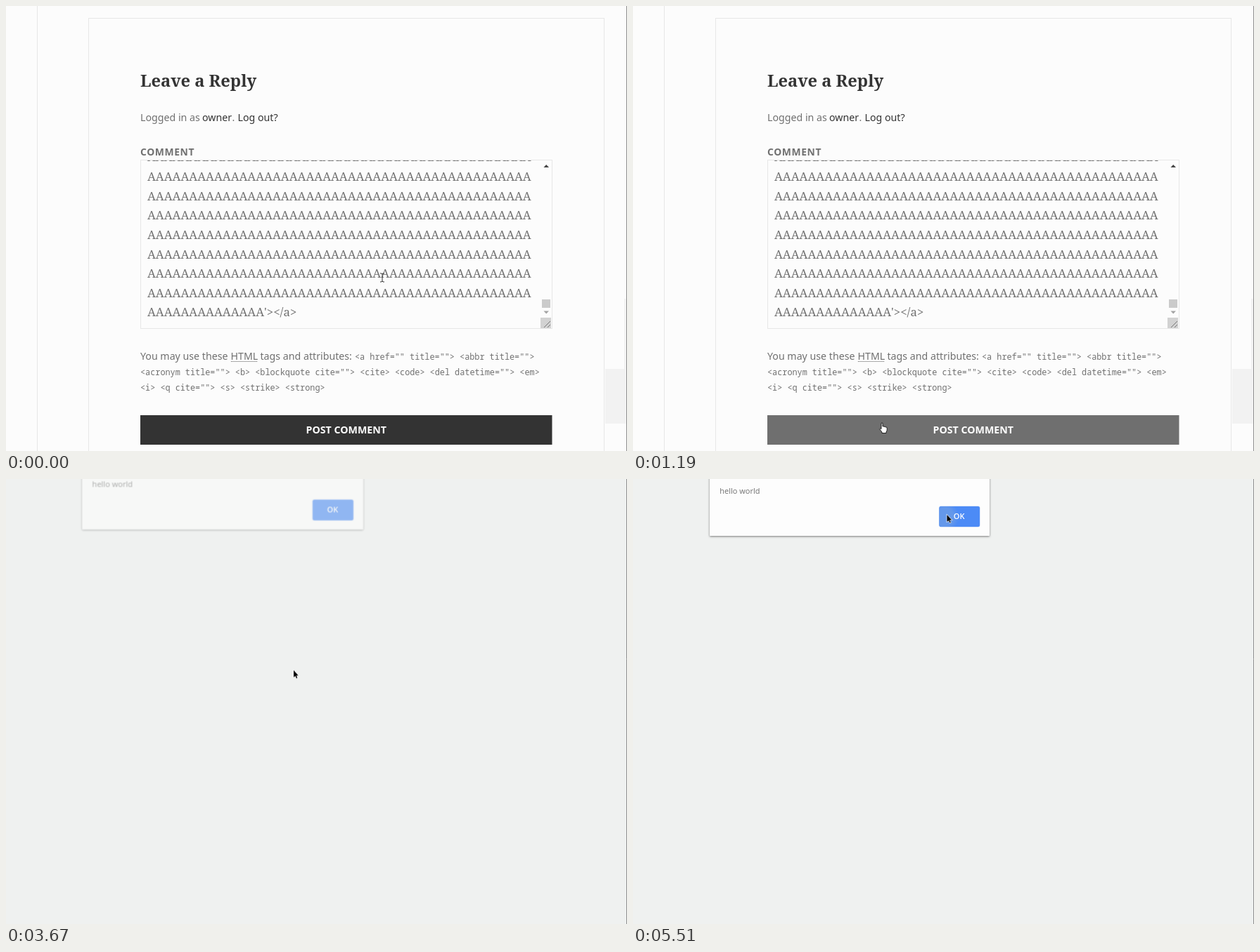
These frames come from a looping animation (883x634 px, 5.63 s). An HTML page:

```html
<!DOCTYPE html>
<html lang="en">
<head>
<meta charset="utf-8">
<title>Reply form</title>
<style>
html, body { margin: 0; width: 100%; height: 100%; overflow: hidden; background: #fcfcfc; }
svg { display: block; width: 883px; height: 634px; }
text { white-space: pre; fill: #707070; }
.sans { font: 14.2px "Noto Sans", sans-serif; }
.bold { font-weight: 700; }
.dark { fill: #333; }
.white { fill: #fff; }
.title { font: 700 23.7px "Noto Serif", serif; fill: #333; }
.label { font-size: 13.9px; letter-spacing: .6px; }
.code { font: 11.83px "Noto Sans Mono", monospace; }
.area text { font: 16.83px "Noto Serif", serif; font-kerning: none; }
.dialog text { font: 11px "Open Sans", sans-serif; }
.dialog .ok { font-weight: 600; fill: #fff; }
.line { fill: none; stroke: #e7e7e7; }

/* every change is a hard cut */
.anim { animation: 5630ms step-end infinite; }
.post { animation-name: post; }
.alert { animation-name: alert; }
.dialog { animation-name: dialog; }
.face { animation-name: face; }
.ripple { animation-name: ripple; }
.pointer { animation-name: move; }
.beam { animation-name: beam; }
.arrow { animation-name: arrow; }
.hand { animation-name: hand; }

@keyframes post {
  0% { fill: #333; }
  16.341% { fill: #525252; }
  18.472%, 100% { fill: #6f6f6f; }
}
@keyframes alert {
  0% { visibility: hidden; }
  65.186%, 100% { visibility: visible; }
}
@keyframes dialog {
  0% { opacity: .55; transform: translate(-1.2px, -9.6px) scale(1.004); }
  67.673%, 100% { opacity: 1; transform: none; }
}
@keyframes face {
  0% { fill: #4285f4; }
  88.454% { fill: #4587f5; }
  93.428%, 100% { fill: #4c8bf6; }
}
@keyframes ripple {
  0% { opacity: 0; }
  93.428% { opacity: .5; }
  97.868%, 100% { opacity: 1; }
}
@keyframes move {
  0% { transform: translate(535px, 387px); }
  4.973% { transform: translate(527px, 398px); }
  7.193% { transform: translate(492px, 434px); }
  9.413% { transform: translate(430px, 497px); }
  11.634% { transform: translate(372px, 556px); }
  13.854% { transform: translate(350.5px, 580px); }
  16.341% { transform: translate(350.5px, 587px); }
  18.472% { transform: translate(350.5px, 594px); }
  21.136% { transform: translate(354px, 594px); }
  55.417% { transform: translate(370px, 525px); }
  57.548% { transform: translate(398px, 364px); }
  60.39% { transform: translate(409px, 272.5px); }
  73.179% { transform: translate(412px, 258px); }
  75.843% { transform: translate(420px, 212px); }
  78.063% { transform: translate(431px, 138px); }
  80.284% { transform: translate(439px, 72px); }
  82.948% { transform: translate(444px, 39px); }
  85.612%, 100% { transform: translate(446.5px, 51px); }
}
@keyframes beam {
  0% { visibility: visible; }
  9.413%, 100% { visibility: hidden; }
}
@keyframes arrow {
  0% { visibility: hidden; }
  9.413% { visibility: visible; }
  21.136% { visibility: hidden; }
  55.417%, 100% { visibility: visible; }
}
@keyframes hand {
  0% { visibility: hidden; }
  21.136% { visibility: visible; }
  55.417%, 100% { visibility: hidden; }
}
</style>
</head>
<body>
<svg viewBox="0 0 883 634">
  <defs>
    <clipPath id="box"><rect x="192" y="220" width="568" height="239"/></clipPath>
    <clipPath id="key"><rect x="435.5" y="39" width="57.5" height="29" rx="2.5"/></clipPath>
    <radialGradient id="glow">
      <stop offset=".6" stop-color="#6498ea"/>
      <stop offset="1" stop-color="#6498ea" stop-opacity="0"/>
    </radialGradient>
    <filter id="shadow" x="-5%" y="-20%" width="110%" height="150%">
      <feDropShadow dx="0" dy="1" stdDeviation="1.6" flood-opacity=".5"/>
    </filter>
  </defs>

  <rect width="883" height="634" fill="#fcfcfc"/>
  <path class="line" d="M44.5 0V634"/>
  <rect class="line" x="117.5" y="17.5" width="733" height="640"/>
  <path d="M852 517H879V417H882V595H852Z" fill="#f2f2f2"/>

  <text class="title" x="191" y="114.7">Leave a Reply</text>
  <g class="sans">
    <text x="191" y="164">Logged in as</text>
    <text class="dark" x="279" y="164">owner</text>
    <text x="321.5" y="164">.</text>
    <text class="dark" x="329.5" y="164">Log out?</text>
    <text class="bold label" x="191" y="213.3">COMMENT</text>
    <text x="191" y="504">You may use these</text>
    <text x="319.5" y="504">HTML</text>
    <text x="361.5" y="504">tags and attributes:</text>
  </g>
  <path d="M320 506.5H358" stroke="#555" stroke-dasharray="1 1"/>
  <g class="code">
    <text x="496" y="504">&lt;a href="" title=""&gt; &lt;abbr title=""&gt;</text>
    <text x="191" y="526">&lt;acronym title=""&gt; &lt;b&gt; &lt;blockquote cite=""&gt; &lt;cite&gt; &lt;code&gt; &lt;del datetime=""&gt; &lt;em&gt;</text>
    <text x="191" y="548">&lt;i&gt; &lt;q cite=""&gt; &lt;s&gt; &lt;strike&gt; &lt;strong&gt;</text>
  </g>

  <rect class="line" x="191.5" y="219.5" width="585" height="240"/>
  <g class="area" id="rows" clip-path="url(#box)"></g>
  <path d="M764.5 230H772L768.2 226Z" fill="#444"/>
  <path d="M764.5 434.5H772L768.2 438.5Z" fill="#a3a3a3"/>
  <rect x="762" y="418" width="12" height="12" fill="#cbcbcb"/>
  <rect x="760" y="444" width="15" height="15" fill="#d2d2d2"/>
  <path d="M765 458L774 449M770 458L774 454" stroke="#777"/>

  <rect class="anim post" x="191" y="583" width="585.5" height="42"/>
  <text class="sans bold white" x="483.8" y="609" text-anchor="middle">POST COMMENT</text>

  <g class="anim alert">
    <rect width="883" height="634" fill="#eff1f0"/>
    <g class="anim dialog">
      <rect x="109" y="-40" width="398" height="121" rx="1" fill="#fdfdfd" filter="url(#shadow)"/>
      <text x="123.3" y="21">hello world</text>
      <rect x="435" y="38.5" width="58.5" height="30" rx="3" fill="#b5cdf6"/>
      <rect class="anim face" x="435.5" y="39" width="57.5" height="29" rx="2.5"/>
      <g clip-path="url(#key)">
        <circle class="anim ripple" cx="443" cy="54" r="21" fill="url(#glow)"/>
      </g>
      <text class="ok" x="463.7" y="57" text-anchor="middle">OK</text>
    </g>
  </g>

  <path d="M882.5 0V634" stroke="#8f8f8f"/>

  <g class="anim pointer">
    <path class="anim beam" d="M-3 -6H-1L0 -5 1 -6H3M0 -5V5M-3 6H-1L0 5 1 6H3" fill="none" stroke="#333"/>
    <path class="anim arrow" d="M0 0V10L2.3 8 3.9 11.6 5.4 11 3.8 7.5H6.8Z" stroke="#fff" stroke-width="1.2" paint-order="stroke"/>
    <path class="anim hand" d="M-1 0.5Q0 -.6 1 .5V5Q2.2 4.2 3 5.4 4.3 4.7 5.2 6 6.8 5.6 7.2 7V10.5L6 13V14.5H0V13L-3.4 8.7Q-3.4 7 -1 8.5Z" fill="#fff" stroke="#111" stroke-width=".9"/>
  </g>
</svg>
<script>
const rows = document.getElementById('rows');

function addRow(y, str) {
  const row = document.createElementNS(rows.namespaceURI, 'text');
  row.setAttribute('x', 201);
  row.setAttribute('y', y);
  row.textContent = str;
  rows.append(row);
}

for (let i = -1; i < 7; i++) addRow(249 + i * 27.64, 'A'.repeat(46));
addRow(249 + 7 * 27.64, 'A'.repeat(14) + "'></a>");
</script>
</body>
</html>
```
